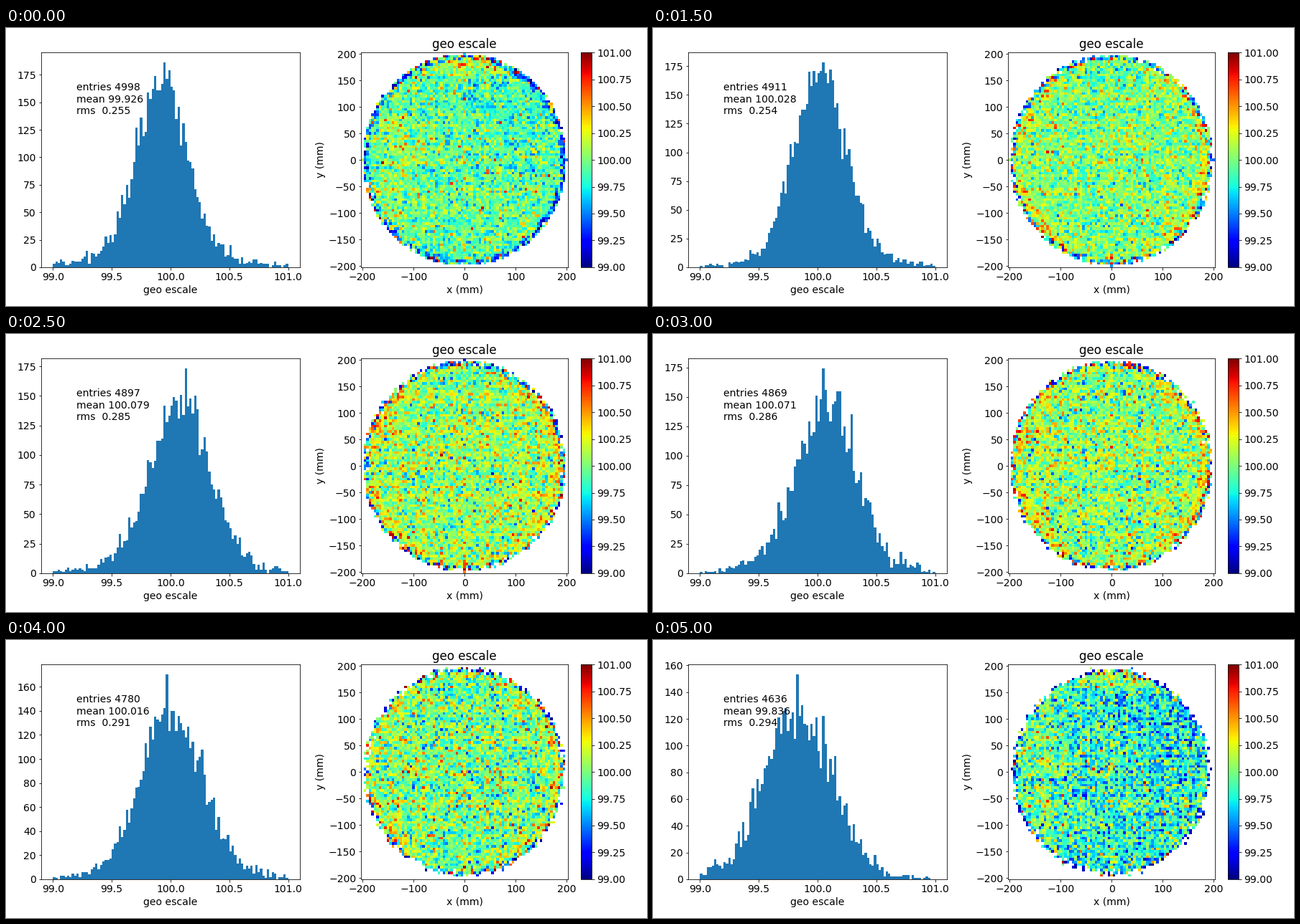
Animation of 892x388 px, one loop 5.5 s. Source, as a matplotlib script:

```python
import numpy as np
import matplotlib.pyplot as plt
from matplotlib.animation import FuncAnimation

W, H, DPI = 892, 388, 72
FRAMES, STEP = 11, 500

# step: entries, mean, rms, tallest bin; steps between are interpolated
STATS = {
    0: (4998, 99.926, .255, 186),
    2: (4979, 99.989, .236, 216),
    3: (4911, 100.028, .254, 178),
    5: (4897, 100.079, .285, 173),
    7: (4841, 100.064, .288, 175),
    9: (4718, 99.969, .294, 166),
    10: (4636, 99.836, .294, 153),
}

EDGES = np.linspace(99, 101, 101)
MIDS = (EDGES[:-1] + EDGES[1:]) / 2

axis = np.arange(-200, 201, 5)
gx, gy = np.meshgrid(axis, axis)
disc = np.flatnonzero(np.hypot(gx, gy) <= 200)
x, y = gx.flat[disc], gy.flat[disc]
r = np.hypot(x, y)

# cell and stripe texture shared by all steps
base_rng = np.random.default_rng(5)
base = base_rng.normal(0, .11, disc.size)
for v in (x, y):
    base += base_rng.normal(0, .04, axis.size)[(v + 200) // 5]


def stats(k):
    return [np.interp(k, list(STATS), col) for col in zip(*STATS.values())]


def bump(v, mid, width):
    return np.exp(-((v - mid) / width) ** 2)


def histogram(k, rng, entries, mean, rms, peak):
    # narrow core on a wide base that fades out over the loop
    tail, ratio = .25 * (1 - (k / 10) ** 2), 1.9
    core = rms / np.sqrt(1 - tail + tail * ratio ** 2)

    def normal(s):
        return np.exp(-((MIDS - mean) / s) ** 2 / 2) / s

    shape = (1 - tail) * normal(core) + tail * normal(ratio * core) + .02
    counts = rng.poisson(entries * shape / shape.sum())
    counts = np.minimum(counts, int(.97 * peak))
    counts[counts.argmax()] = peak
    return counts


def disc_map(k, rng, entries, counts):
    # bands are strongest at both ends of the loop, the ring in the middle
    ends = abs(k / 5 - 1) ** 3
    edge = np.clip((r - 184) / 10, 0, 1)
    score = base + rng.normal(0, .16, r.size)
    score += (.5 * ends - .1) * np.clip((y - 140) / 40, 0, 1) * bump(x, 10, 130)
    score += .22 * (1 - ends) * bump(r, 186, 14) * (.5 + np.abs(x) / 400)
    score += edge * rng.normal(-.22 - .15 * ends, .5, r.size)
    score += .1 * ends * (bump(x, -145, 50) + .5 * bump(x, 160, 25)) * bump(y, 0, 110)
    score -= .1 * ends * np.clip((x + y) / 200, 0, 1)

    # ragged rim: the outermost cells have no value
    keep = np.argsort(r + rng.normal(0, 4, r.size))[:entries]
    ranked = keep[np.argsort(score[keep])]
    total = np.concatenate([[0], counts.cumsum()]) / counts.sum()
    img = np.full(gx.shape, np.nan)
    img.flat[disc[ranked]] = np.interp((np.arange(entries) + .5) / entries, total, EDGES)
    return img


def state(k):
    rng = np.random.default_rng(100 + k)
    entries, mean, rms, peak = stats(k)
    entries, peak = round(entries), round(peak)
    counts = histogram(k, rng, entries, mean, rms, peak)
    label = f"entries {entries}\nmean {mean:.3f}\nrms  {rms:.3f}"
    return counts, peak, label, disc_map(k, rng, entries, counts)


plt.rcParams.update({"font.family": "DejaVu Sans", "font.size": 14})
fig = plt.figure(figsize=(W / DPI, H / DPI), dpi=DPI, facecolor="white")


def panel(left, width):
    return fig.add_axes([left / W, 54.1 / H, width / W, 299.7 / H])


hist_ax, map_ax, bar_ax = panel(48.9, 360), panel(494.2, 288), panel(800.2, 15)

bars = hist_ax.bar(MIDS, np.zeros(100), width=.02, color="#1f77b4")
hist_ax.set_xlim(98.9, 101.1)
hist_ax.set_xlabel("geo escale")
note = hist_ax.text(99.2, 0, "")

image = map_ax.imshow(np.full(gx.shape, np.nan), cmap="jet", vmin=99, vmax=101,
                      origin="lower", extent=(-202.5, 202.5, -202.5, 202.5),
                      aspect="auto", interpolation="nearest")
map_ax.set_title("geo escale")
map_ax.set_xlabel("x (mm)")
map_ax.set_ylabel("y (mm)")
fig.colorbar(image, cax=bar_ax)

STATES = [state(k) for k in range(FRAMES)]


def draw(k):
    counts, peak, label, img = STATES[k]
    for bar, n in zip(bars, counts):
        bar.set_height(n)
    hist_ax.set_ylim(0, 1.05 * peak)
    note.set_text(label)
    note.set_y(.75 * peak)
    image.set_data(img)
    return [*bars, note, image]


anim = FuncAnimation(fig, draw, frames=FRAMES, init_func=lambda: draw(0),
                     interval=STEP, repeat=True, repeat_delay=0, blit=False)
plt.show()
```
